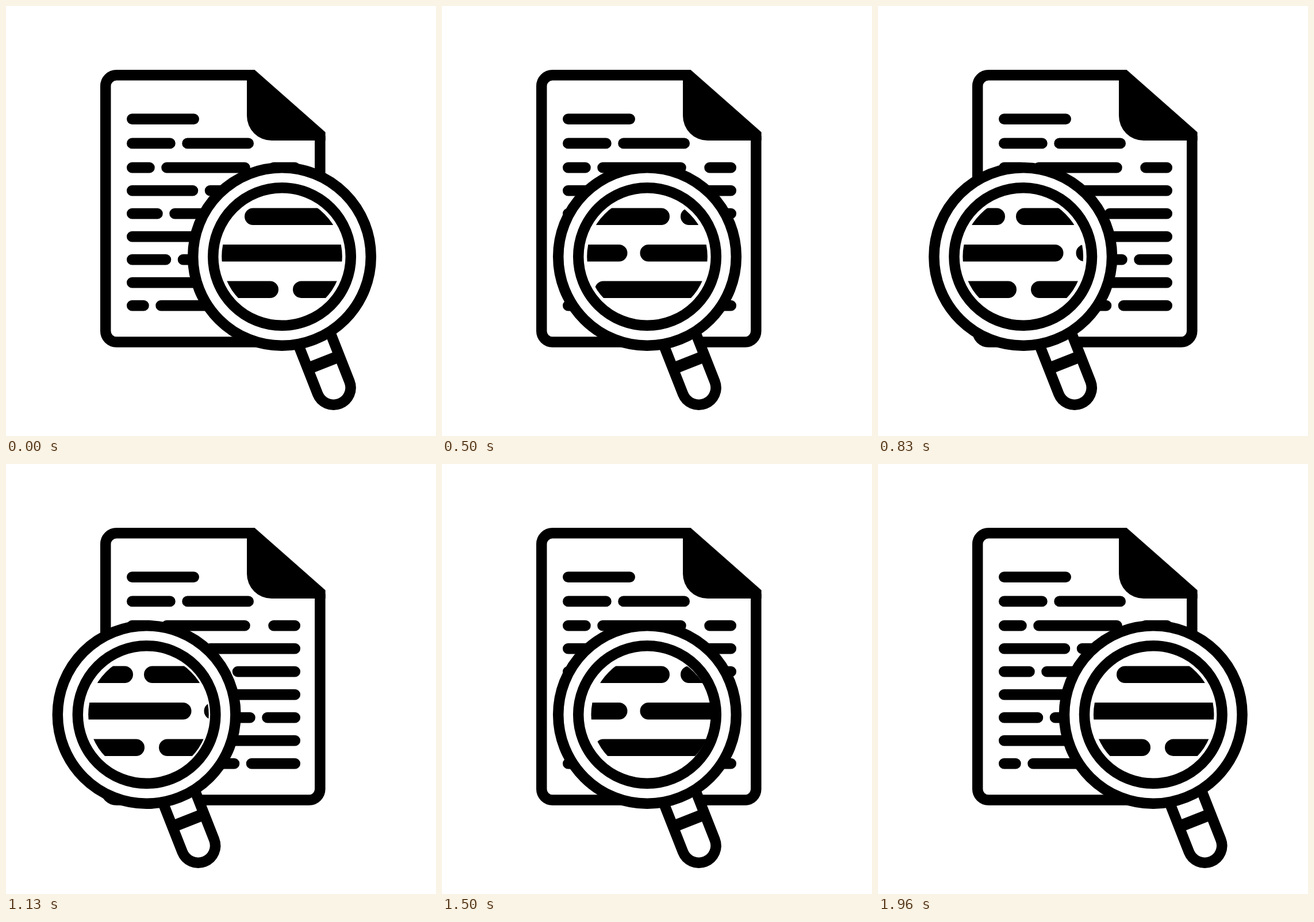
An HTML page that plays this animation: 748x748 px, repeating every 2000 ms.

```html
<!DOCTYPE html>
<html lang="en">
<head>
<meta charset="utf-8">
<title>Document search</title>
<style>
  html, body { margin: 0; width: 100%; height: 100%; overflow: hidden; background: #fff; }
  svg { display: block; width: 100vw; height: 100vh; }
  .line { fill: none; stroke: #000; stroke-width: 18.5; }
  .paper { fill: #fff; }
  .bars { fill: none; stroke: #000; stroke-linecap: round; }
</style>
</head>
<body>
<svg viewBox="0 0 748 748">
  <defs>
    <clipPath id="view"><circle id="viewCircle" cy="436" r="104.8"/></clipPath>
  </defs>

  <g id="page">
    <path class="line" d="M428 120.3H192.2a19 19 0 0 0-19 19V565.6a19 19 0 0 0 19 19H527.3a19 19 0 0 0 19-19V226"/>
    <path d="M419 111H432.5L555.6 219.5V234H462A43 43 0 0 1 419 191Z"/>
    <path class="bars" id="text"/>
  </g>

  <g id="lens">
    <g transform="rotate(-21.5)">
      <path class="line paper" d="M-29.7 150V245A29.7 29.7 0 0 0 29.7 245V150"/>
      <path d="M-29 187.4H29V208H-29Z"/>
    </g>
    <circle class="line paper" r="154.8"/>
  </g>

  <g clip-path="url(#view)">
    <path class="bars" id="zoomed"/>
  </g>

  <circle class="line" id="rim" r="119.8"/>
</svg>

<script>
  const LOOP = 2000, FPS = 24, HALF = 24;
  const RIGHT = 480, LEFT = 234, LENS_Y = 436;
  const get = id => document.getElementById(id);

  // One row of round bars: a span cut by gaps; pieces too short for their caps vanish.
  function row(y, start, end, centres, gap, height) {
    const cap = height / 2;
    let d = "", from = start;
    for (const c of [...centres, end + gap / 2]) {
      const to = c - gap / 2;
      if (to - from > height) d += `M${from + cap} ${y}H${to - cap}`;
      from = c + gap / 2;
    }
    return d;
  }

  function drawBars(id, height, rows) {
    get(id).setAttribute("stroke-width", height);
    get(id).setAttribute("d", rows.join(""));
  }

  // Gap centres for each row of the page, then for the enlarged rows.
  const pageGaps = [[], [300.5], [264.5, 430.5, 450.5], [340], [278.5, 388], [], [293, 439.5], [], [254.5, 412]];
  const zoomGaps = [[230.5, 405.5], [333.5], [253.5, 486.5]];

  drawBars("text", 18.7, pageGaps.map((gaps, i) =>
    row(281.2 + (i - 2) * (i < 2 ? 42.3 : 40), 210, Math.min(336 + 95 * i, 512), gaps, 11.5, 18.7)));
  drawBars("zoomed", 29.5, zoomGaps.map((gaps, i) =>
    row(366.2 + 63.5 * i, 80, 640, gaps, 19 + 3 * i, 29.5)));

  const smooth = p => p * p * (3 - 2 * p);

  // Lens position after a number of steps, there and back.
  function lensX(step) {
    const p = step < HALF ? step / HALF : 2 - step / HALF;
    return RIGHT + (LEFT - RIGHT) * smooth(p);
  }

  function draw() {
    const t = performance.now() % LOOP;
    const step = Math.floor((t + 4) * FPS / 1000) % (2 * HALF);
    const x = lensX(step);
    for (const id of ["lens", "rim"])
      get(id).setAttribute("transform", `translate(${x} ${LENS_Y})`);
    // The visible area runs about half a step ahead on the way back.
    get("viewCircle").setAttribute("cx", step > HALF ? lensX(step + 0.47) : x);
    requestAnimationFrame(draw);
  }
  draw();
</script>
</body>
</html>
```
